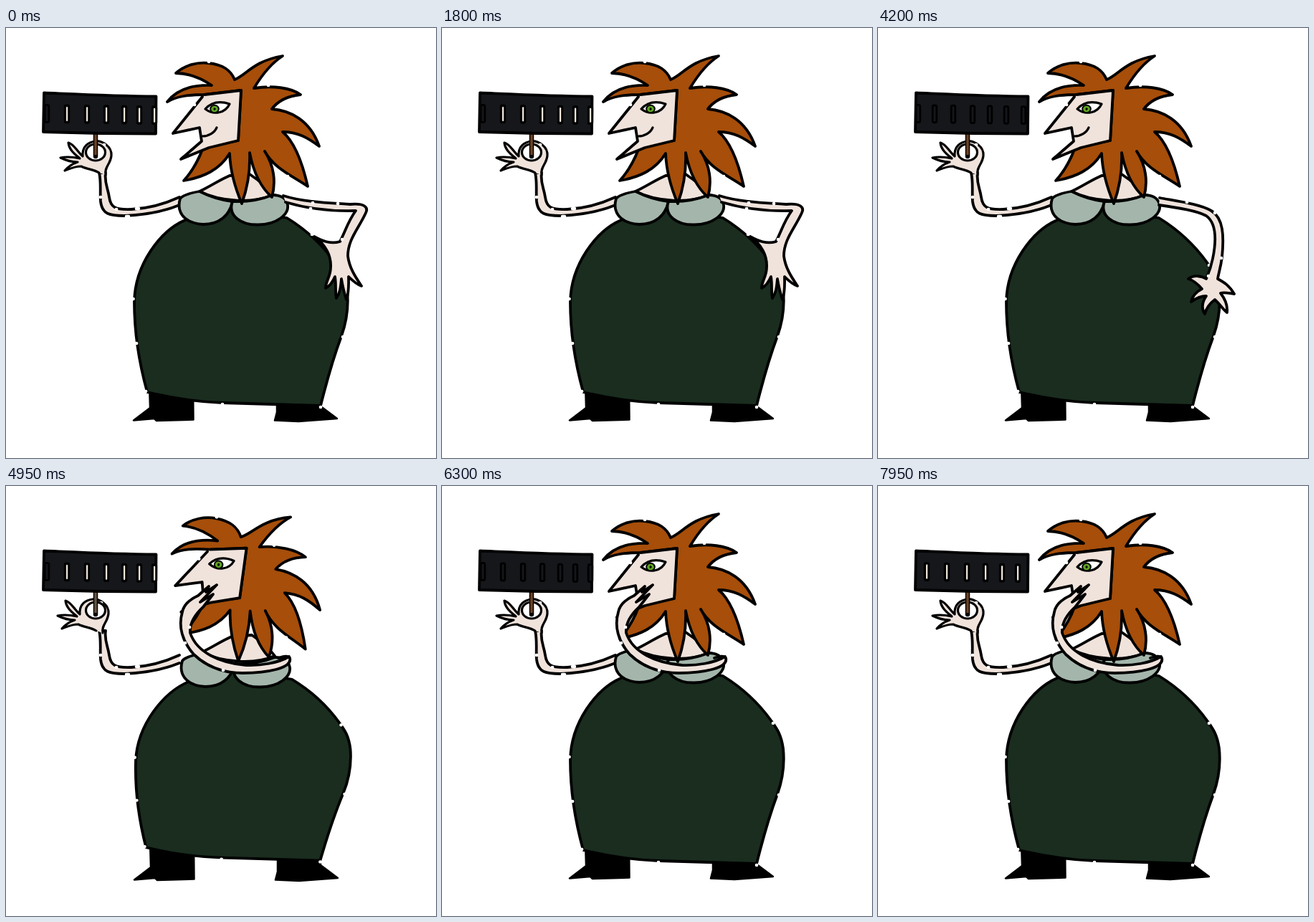
Recreate the animation shown at these times as an HTML page. Size 600 px wide and 600 px high, loop 8 s.

```html
<!DOCTYPE html>
<html lang="en">
<head>
<meta charset="utf-8">
<title>Woman with a slotted drum</title>
<style>
html, body { margin: 0; width: 100%; height: 100%; overflow: hidden; background: #fff; }
svg { display: block; width: 100%; height: 100%; }
path, ellipse, rect { stroke: #000; stroke-width: 3.8; stroke-linecap: round; stroke-linejoin: round; fill: none; }
.skin { fill: #f0e3dc; }
.hair { fill: #a64e0a; }
.skirt { fill: #1a2d1f; }
.bust { fill: #a4b6ab; }
.drum { fill: #15171b; }
.white { fill: #fff; }
.shoe { fill: #000; stroke-width: 2.5; }
.gap { stroke: #fff; stroke-width: 4.6; }
.bare { stroke: none; }
.thin { stroke-width: 3.2; }
.slit { stroke-width: 2.8; fill: #15171b; }
.light { stroke: none; fill: #efe6da; }
</style>
</head>
<body>
<svg viewBox="0 0 600 600">
  <g id="shoes">
    <path class="shoe" d="M200 495L201 530L178 547.500L207 545L210 548L261.500 546.500L261 495Z"/>
    <path class="shoe" d="M378 500L378 536L375 547.500L408 549L462 545L438 527L436 500Z"/>
  </g>

  <g id="skirt">
    <path class="skirt" d="M250 268C215 283 180 330 179 382C179 430 187 472 197 508C225 515 255 521 303 523C350 524 395 526 439 527C447 495 456 462 468 430C477 405 478 385 476 366C473 345 466 337 459 327C441 302 418 281 392 265L316 252"/>
    <path class="gap" d="M177.500 378h.1M182 440h.1M195 507h.1M302 525h.1M439 529h.1M470 431h.1M462 331h.1"/>
  </g>

  <g id="leftArm">
    <path class="skin" d="M242 236C218 247 198 252 175 253C152 254 146 250 144 236C142 222 137 216 139 202L130 202C133 215 131 228 132 242C134 260 145 262 165 262C192 261 220 256 242 247"/>
    <path class="gap" d="M154 253h.1M182 252h3M168 263h3M132 236h.1"/>
    <g id="hand">
      <path class="skin thin" d="M130 202C122 197 112 197 105 193C96 193 90 196 82 199C88 192 94 189 100 187C92 187 84 185 76 181C86 179 94 180 103 182C96 176 88 170 87 160C95 162 99 172 107 179C106 165 115 159 125 158C135 157 148 166 147 178C146 190 137 194 139 205"/>
      <path class="gap" d="M137 163h.1"/>
    </g>
    <ellipse class="white thin" cx="125" cy="173.500" rx="13.500" ry="11.500"/>
  </g>

  <path id="stick" d="M125 148V179" style="stroke-width:6.500"/>
  <path id="stickCore" d="M125 148V177" style="stroke:#6d4327;stroke-width:3.500;stroke-linecap:butt"/>
  <path class="drum" d="M53 90.500C90 92 150 95 209.500 95.500L209 147.500C160 147.500 100 146.500 52 145Z"/>
  <g id="slits"></g>

  <g id="chest">
    <path class="skin" d="M270 228C285 221 298 212 312 206L340 204C352 212 364 222 372 233C345 245 300 243 270 228Z"/>
  </g>
  <g id="bust">
    <path class="bust" d="M270 228C258 230 247 233 243 238C238 255 246 272 275 274C297 274 312 262 316 242C298 240 284 235 270 228Z"/>
    <path class="bust" d="M316 242C309 262 328 275 352 274.500C378 274 395 260 393 247C391 237 382 233 372 233C352 241 334 243 316 242Z"/>
  </g>

  <g id="head">
    <path class="hair" d="M237 63C249 52 267 47 283 49C302 51 313 58 319 72C335 66 345 46 386 39C372 48 358 64 346 84C372 80 397 83 411 93C392 95 380 101 371 113C396 115 424 128 437 165C421 153 407 145 386 145C404 160 414 190 421 221C399 206 374 196 361 172C374 192 377 215 371 236C355 222 345 200 340 174C341 202 337 223 329 245C320 224 313 200 312 175C298 198 276 208 248 213C261 199 269 183 275 167L324 157L328 87L277 93C255 93 239 95 225 103C238 86 260 79 287 80C269 68 254 63 237 63Z"/>
    <path class="skin bare" d="M277 93L328 87L324 157L283 167L244 183L272 158L270 139L233 147Z"/>
    <path d="M277 93L328 87L324 157L283 167L244 183L273 158L270 139L233 147L274 96"/>
    <path id="smile" class="thin" d="M274 151C283 151 291 146 294 139"/>
    <path class="white thin" d="M278 113C288 102 300 102 312 106C306 119 290 122 278 113Z"/>
    <ellipse cx="291" cy="113" rx="5.800" ry="5.300" style="fill:#5da51f;stroke-width:2"/>
    <ellipse cx="291" cy="113" rx="1" ry="1.500" style="fill:#000;stroke-width:1"/>
    <path class="gap" d="M283 47h.1M366 80h.1M263 107h.1M393 207h.1"/>
  </g>

  <g id="hip">
    <path class="skin" d="M387 234C415 243 450 244 480 246C500 244 506 250 502 258C492 280 477 295 477 318C479 335 488 348 496 360C490 358 484 353 478 347C478 358 479 368 475 379C472 370 470 362 468 350C467 362 466 370 461 377C459 368 461 358 459 347C456 354 452 360 446 363C446 353 453 347 453 334C454 318 446 302 430 291C441 297 453 302 466 298C473 285 477 270 488 255C450 256 420 252 390 243"/>
    <path class="gap" d="M428 244h.1M463 245h.1M425 252h.1M469 295h.1M427 288h.1"/>
  </g>
  <g id="hang">
    <path class="skin" d="M393 237C420 242 450 246 465 255C482 265 483 290 480 320C478 335 475 343 474 350C483 355 490 359 497 371C489 370 483 368 478 370C485 379 488 388 487 397C480 391 476 384 470 379C462 385 458 391 456 399C450 390 454 380 458 374C450 374 444 377 437 382C439 372 446 367 452 364C446 357 440 352 433 350C441 344 452 346 458 350C462 341 465 332 467 322C472 298 473 273 458 262C445 255 420 251 392 247"/>
    <path class="gap" d="M431 243h.1M470 258h.1M479 321h.1M461 346h.1"/>
  </g>
  <g id="cover">
    <path class="skin" d="M395 238C380 247 355 251 335 250C298 247 266 232 257 205C256 192 263 180 275 169L289 151L271 162L294 138L279 148L283 140L268 153C257 158 248 165 246 176C240 196 246 217 262 235C282 254 305 261 330 261C365 261 400 254 396 240C393 236 387 238 380 240"/>
    <path class="gap" d="M250 219h.1M256 197h.1M303 257h.1"/>
  </g>
</svg>
<script>
const STEP = 150, LOOP = 8000;
const HANG_AT = 24, COVER_AT = 30, SETTLE_AT = 36;
const SLOTS = [
  [57, 85, 113, 140, 165, 186, 207],
  [56, 79, 105, 132, 156, 179, 203],
  [68, 96, 124, 150, 173, 195]
];
// Offsets of the redrawn figure during the gasp
const LEAN = {
  head: 'translate(5 -1) rotate(4.5 320 120)',
  skirt: 'matrix(1.0067 0 -.03 .965 12.3 14)',
  bust: 'translate(3 6)',
  chest: 'translate(3 4)',
  shoes: 'translate(1 2)',
  hand: 'translate(-4 0)'
};
const el = id => document.getElementById(id);
const show = (id, on) => el(id).setAttribute('display', on ? 'inline' : 'none');

function slit(x, lit) {
  const y = 107.5 + (x - 60) * .015;
  const frame = `<rect class="slit" x="${x - 2.8}" y="${y}" width="5.6" height="24" rx="2"/>`;
  return frame + (lit ? `<rect class="light" x="${x - 1}" y="${y + 2}" width="2.2" height="20" rx="1"/>` : '');
}

function draw(n) {
  const phase = n % 3;
  const lit = phase === 2 || (phase === 0 && n < SETTLE_AT);
  el('slits').innerHTML = SLOTS[phase].map(x => slit(x, lit && x > 60)).join('');

  show('hip', n < HANG_AT);
  show('hang', n >= HANG_AT && n < COVER_AT);
  show('cover', n >= COVER_AT);
  show('smile', n < COVER_AT);

  const lean = n >= COVER_AT && n < SETTLE_AT;
  for (const id in LEAN) el(id).setAttribute('transform', lean ? LEAN[id] : '');
  el('stickCore').style.stroke = lean ? '#665444' : '#6d4327';
}

let last = -1;
function tick(now) {
  const n = Math.floor(now % LOOP / STEP);
  if (n !== last) draw(last = n);
  requestAnimationFrame(tick);
}
draw(0);
requestAnimationFrame(tick);
</script>
</body>
</html>
```
